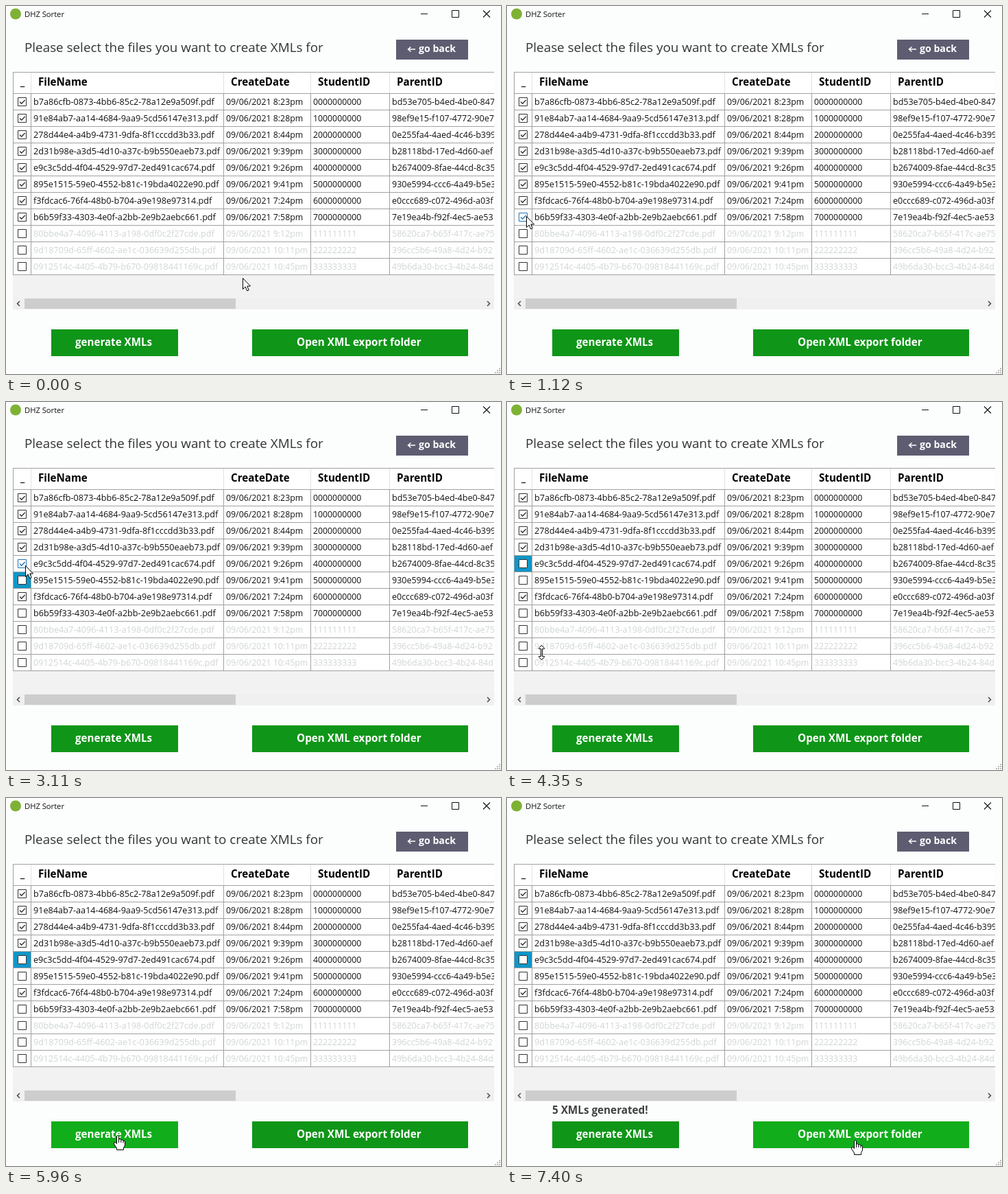
Animation of 722x536 px, one loop 8000 ms. Source, as an HTML page with a canvas:

```html
<!DOCTYPE html>
<html lang="en">
<head>
<meta charset="utf-8">
<title>File selection</title>
<style>
html, body { margin: 0; width: 100%; height: 100%; overflow: hidden; background: #fcfdfd; }
canvas { display: block; }
</style>
</head>
<body>
<canvas id="stage" width="722" height="536"></canvas>
<script>
const ctx = document.getElementById('stage').getContext('2d');
const LOOP = 8000, TOP = 127, ROW = 24;
const FONT = '"Open Sans", "Noto Sans", sans-serif';
const GREEN = '#0f9518', BRIGHT = '#11ad1b', LINE = '#a0a0a0';

// file name, time, student, parent
const rows = `b7a86cfb-0873-4bb6-85c2-78a12e9a509f|8:23pm|0000000000|bd53e705-b4ed-4be0-847
91e84ab7-aa14-4684-9aa9-5cd56147e313|8:28pm|1000000000|98ef9e15-f107-4772-90e7
278d44e4-a4b9-4731-9dfa-8f1cccdd3b33|8:44pm|2000000000|0e255fa4-4aed-4c46-b399
2d31b98e-a3d5-4d10-a37c-b9b550eaeb73|9:39pm|3000000000|b28118bd-17ed-4d60-aef
e9c3c5dd-4f04-4529-97d7-2ed491cac674|9:26pm|4000000000|b2674009-8fae-44cd-8c35
895e1515-59e0-4552-b81c-19bda4022e90|9:41pm|5000000000|930e5994-ccc6-4a49-b5e3
f3fdcac6-76f4-48b0-b704-a9e198e97314|7:24pm|6000000000|e0ccc689-c072-496d-a03f
b6b59f33-4303-4e0f-a2bb-2e9b2aebc661|7:58pm|7000000000|7e19ea4b-f92f-4ec5-ae53
80bbe4a7-4096-4113-a198-0df0c2f27cde|9:12pm|111111111|58620ca7-b65f-417c-ae75
9d18709d-65ff-4602-ae1c-036639d255db|10:11pm|222222222|396cc5b6-49a8-4d24-b92
0912514c-4405-4b79-b670-09818441169c|10:45pm|333333333|49b6da30-bcc3-4b24-84d`
  .split('\n').map(r => r.split('|'));
const ENABLED = 8, BOTTOM = TOP + ROW * rows.length;

const clicks = [
  { row: 7, down: 1390, up: 1560 },
  { row: 5, down: 2430, up: 2590 },
  { row: 4, down: 3550, up: 3760 }
];

// each move: [time, x, y] points, at rest at both ends
const moves = [
  [[325, 345, 396], [450, 331, 399], [740, 165, 366], [1120, 28, 306]],
  [[1715, 28, 306], [2120, 28, 262]],
  [[2815, 28, 262], [3110, 28, 238]],
  [[3880, 28, 238], [4350, 50, 365], [4695, 105, 450], [5140, 163, 491]],
  [[6420, 163, 491], [6750, 240, 494], [6980, 395, 503], [7260, 508, 499], [7400, 508, 498]]
];

function slope(pts, i, k) {
  if (i === 0 || i === pts.length - 1) return 0;
  return (pts[i + 1][k] - pts[i - 1][k]) / (pts[i + 1][0] - pts[i - 1][0]);
}

function pointer(t) {
  let pos = moves[0][0].slice(1);
  for (const pts of moves) {
    if (t < pts[0][0]) break;
    const i = pts.findIndex(p => p[0] > t) - 1;
    if (i < 0) { pos = pts[pts.length - 1].slice(1); continue; }
    const a = pts[i], b = pts[i + 1], d = b[0] - a[0], u = (t - a[0]) / d;
    const s = u * u * (3 - 2 * u);
    return [1, 2].map(k => Math.round(
      a[k] + (b[k] - a[k]) * s +
      d * (slope(pts, i, k) * u * (1 - u) * (1 - u) - slope(pts, i + 1, k) * u * u * (1 - u))));
  }
  return pos;
}

const within = ([x, y], l, t, r, b) => x >= l && x < r && y >= t && y < b;

function rect(x, y, w, h, color) {
  ctx.fillStyle = color;
  ctx.fillRect(x, y, w, h);
}

function text(str, x, y, size, color, weight = 400) {
  ctx.font = `${weight} ${size}px ${FONT}`;
  ctx.fillStyle = color;
  ctx.fillText(str, x, y);
}

function stroke(d, color, width = 1) {
  ctx.strokeStyle = color;
  ctx.lineWidth = width;
  ctx.stroke(new Path2D(d));
}

function titleBar() {
  ctx.fillStyle = '#7fb135';
  ctx.beginPath();
  ctx.arc(14, 11.5, 8, 0, Math.PI * 2);
  ctx.fill();
  text('DHZ Sorter', 27, 16, 11.2, '#111');
  stroke('M605 11.5H615M650.5 6.5H660.5V16.5H650.5Z', '#111');
  stroke('M696 6.5L706 16.5M706 6.5L696 16.5', '#111', 1.1);
}

function checkbox(y, checked, hover, pressed) {
  const ink = hover ? '#2673b8' : '#333';
  rect(17, y, 13, 13, pressed ? '#cce4f7' : '#fff');
  stroke(`M17.5 ${y + .5}h12v12h-12Z`, ink);
  if (checked) stroke(`M20 ${y + 6.5}l2.7 2.8l5 -5.4`, ink, 1.4);
}

function table(t, pos) {
  rect(10, 96, 702, BOTTOM - 95, '#fff');
  rect(10, BOTTOM + 1, 702, 50, '#f2f2f2');
  for (const x of [36, 317, 444, 559]) {
    rect(x, 97, 1, 30, '#e2e2e2');
    rect(x, TOP, 1, BOTTOM - TOP, LINE);
  }
  rect(10, 96, 702, 1, LINE);
  rect(10, 96, 1, BOTTOM - 95, LINE);
  for (let y = TOP; y <= BOTTOM; y += ROW) rect(10, y, 702, 1, LINE);

  [['_', 21], ['FileName', 47], ['CreateDate', 328], ['StudentID', 455], ['ParentID', 570]]
    .forEach(([s, x]) => text(s, x, 116, 15.15, '#000', 700));

  const last = clicks.filter(c => t >= c.down).pop();
  ctx.save();
  ctx.beginPath();
  ctx.rect(10, 96, 702, 300);
  ctx.clip();
  rows.forEach(([name, time, student, parent], i) => {
    const y = TOP + ROW * i, base = y + 17;
    const color = i < ENABLED ? '#111' : '#d0d5d6';
    const click = clicks.find(c => c.row === i);
    if (last && last.row === i) rect(11, y + 1, 25, 23, '#0f96c8');
    checkbox(y + 6, i < ENABLED && !(click && t >= click.up),
      within(pos, 17, y + 6, 30, y + 19), click && t >= click.down && t < click.up);
    text(name + '.pdf', 40, base, 12.65, color);
    text('09/06/2021 ' + time, 321, base, 12.35, color);
    text(student, 448, base, 12.3, color);
    text(parent, 563, base, 12.5, color);
  });
  ctx.restore();

  rect(10, 425, 702, 17, '#f0f0f0');
  rect(27, 426, 308, 15, '#cdcdcd');
  stroke('M20 430L16.5 433.5L20 437M702 430L705.5 433.5L702 437', '#505050', 1.6);
}

function button(x, y, w, h, color) {
  rect(x, y, w, h, color);
}

function controls(t, pos) {
  text('Please select the files you want to create XMLs for', 27, 67, 18.83, '#333');
  button(569, 49, 105, 29, '#5e5c70');
  stroke('M586.5 63H597M590.5 59.5L586.5 63L590.5 66.5', '#fff', 1.5);
  text('go back', 602, 67, 14.15, '#fff', 700);

  const pressed = t >= 5890 && t < 5960;
  const hot = within(pos, 66, 471, 251, 510);
  button(66, 471, 185, 39, pressed ? '#0c8514' : hot ? BRIGHT : GREEN);
  text('generate XMLs', 101, 495, 15.15, '#fff', 700);
  button(359, 471, 315, 39, within(pos, 359, 471, 674, 510) ? BRIGHT : GREEN);
  text('Open XML export folder', 424, 495, 15.25, '#fff', 700);
  if (t >= 6440) text('5 XMLs generated!', 66, 460, 15.28, '#404040', 700);

  for (let r = 0; r < 3; r++)
    for (let c = 0; c <= r; c++) rect(719 - c * 3, 527 + r * 3, 2, 2, '#bcbcbc');
}

const shapes = {
  arrow: ['M.5 .5V16.5L4.2 13L6.7 18.8L9.2 17.8L6.8 12H11.5Z'],
  resize: ['M.5 -10.5L4.5 -6.5V-5.5H1.5V5.5H4.5V6.5L.5 10.5L-3.5 6.5V5.5H-.5V-5.5H-3.5V-6.5Z'],
  hand: ['M-1.5 1.5Q0 -.5 1.5 1.5V6Q4 5 4.8 7Q7 6 8 8Q10.5 7.5 10.5 10V15L8.5 18.5V21.5H-1.5V19L-5.5 13Q-6 10 -3.5 10.5L-1.5 12.5Z',
    'M1.5 6V11M4.8 7V11M8 8V11.5']
};

function cursor(pos) {
  const [x, y] = pos;
  const overButton = within(pos, 66, 471, 251, 510) || within(pos, 359, 471, 674, 510);
  const off = (y - TOP + ROW) % ROW;
  const onLine = within(pos, 11, TOP - 3, 712, BOTTOM + 4) && Math.min(off, ROW - off) <= 3;
  const [body, detail] = shapes[overButton ? 'hand' : onLine ? 'resize' : 'arrow'];
  ctx.save();
  ctx.translate(x, y);
  ctx.fillStyle = '#fff';
  ctx.fill(new Path2D(body));
  stroke(body, '#000');
  if (detail) stroke(detail, '#000');
  ctx.restore();
}

function draw(t) {
  const pos = pointer(t);
  rect(0, 0, 722, 536, '#fcfdfd');
  titleBar();
  table(t, pos);
  controls(t, pos);
  cursor(pos);
}

let start;
function tick(now) {
  start ??= now;
  draw((now - start) % LOOP);
  requestAnimationFrame(tick);
}
draw(0);
requestAnimationFrame(tick);
</script>
</body>
</html>
```
